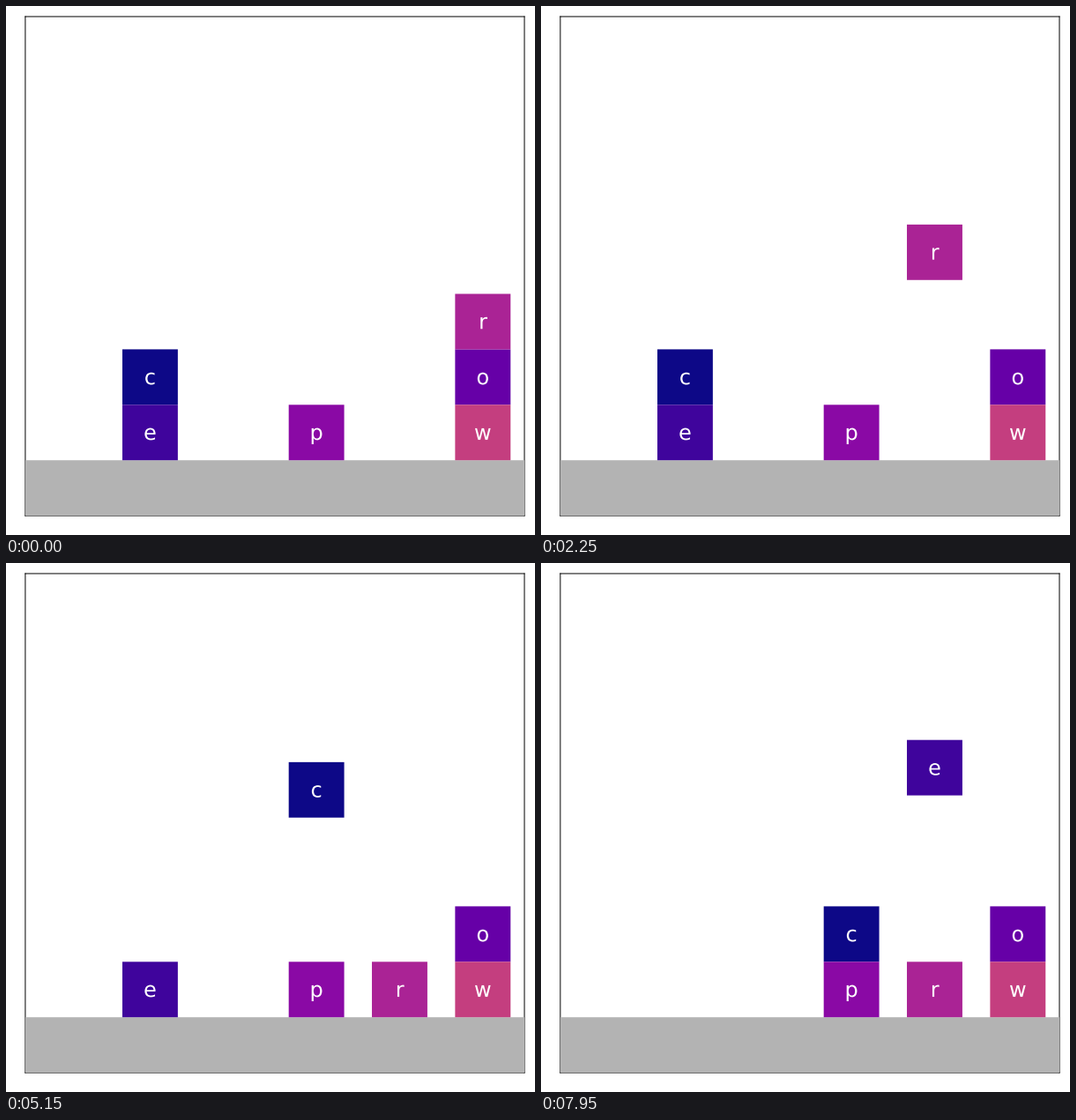
These frames come from a looping animation (600 by 600 pixels, 8000 ms). A matplotlib script:

```python
import matplotlib.pyplot as plt
from matplotlib.animation import FuncAnimation
from matplotlib.patches import PathPatch, Rectangle
from matplotlib.textpath import TextPath
from matplotlib.transforms import Affine2D

SIZE, DPI = 600, 80
FRAMES, INTERVAL = 160, 50
NEAR, FAR = 21.9, 12.0       # margins in pixels: left and bottom, right and top
CELLS = 9
CELL = (SIZE - NEAR - FAR) / CELLS
FONT = 24 / CELL             # letter size in cells
MID_LINE = 0.346             # middle of the text line above its baseline, in em
HOLD_Y = 5                   # height at which a block is carried
CYCLE = 58                   # frames from one pick-up to the next
LIFT, SHIFT = 20, 10         # steps of a vertical and a horizontal leg

# name: (column, level); the order sets the colour
START = {"c": (1, 1), "e": (1, 0), "o": (5, 1),
         "p": (3, 0), "r": (5, 2), "w": (5, 0)}
# block, target column, target level
MOVES = [("r", 4, 0), ("c", 3, 1), ("e", 4, 1)]


def column_x(col):
    return 1.5 * col + 0.25


def leg(step, length):
    """Progress from 0 to 1 along a leg."""
    return min(max(step / length, 0), 1)


def since(frame, start):
    """Steps done in a phase, whose first step is skipped."""
    step = frame - start
    return step if step >= 2 else 0


def mix(a, b, t):
    return a + (b - a) * t


def place(name, frame):
    col, level = START[name]
    x, y = column_x(col), level
    for i, (mover, to_col, to_level) in enumerate(MOVES):
        if mover != name:
            continue
        pick = since(frame, CYCLE * i - 1)
        put = since(frame, CYCLE * i + 28)
        x = mix(x, column_x(to_col), leg(put, SHIFT))
        y = mix(y, HOLD_Y, leg(pick, LIFT))
        y = mix(y, to_level, leg(put - SHIFT, LIFT))
    return x, y


def glyphs(text):
    return TextPath((0, 0), text, size=FONT, prop={"family": "DejaVu Sans"})


def letter_path(char):
    """Letter centred in a unit cell by its advance width."""
    path = glyphs(char)
    advance = glyphs(char * 2).get_extents().width - path.get_extents().width
    shift = Affine2D().translate(0.5 - advance / 2, 0.5 - MID_LINE * FONT)
    return shift.transform_path(path)


fig = plt.figure(figsize=(SIZE / DPI, SIZE / DPI), dpi=DPI, facecolor="white")
side = CELL * CELLS / SIZE
ax = fig.add_axes([NEAR / SIZE, NEAR / SIZE, side, side])
ax.set(xlim=(0, CELLS), ylim=(-1, CELLS - 1), xticks=[], yticks=[])
for spine in ax.spines.values():
    spine.set(linewidth=72 / DPI, snap=False)


def add(patch, color, zorder):
    patch.set(facecolor=color, edgecolor="none", snap=False, zorder=zorder)
    ax.add_patch(patch)
    patch.set_clip_on(False)
    return patch


add(Rectangle((0, -1), CELLS, 1), "0.7", 3)

plasma = plt.get_cmap("plasma")
blocks = {}
for i, name in enumerate(START):
    blocks[name] = (add(Rectangle((0, 0), 1, 1), plasma(24 * i), 4),
                    add(PathPatch(letter_path(name)), "white", 5))


def draw(frame):
    for name, (box, letter) in blocks.items():
        x, y = place(name, frame)
        box.set_xy((x, y))
        letter.set_transform(Affine2D().translate(x, y) + ax.transData)
    return [artist for pair in blocks.values() for artist in pair]


anim = FuncAnimation(fig, draw, frames=FRAMES, interval=INTERVAL,
                     repeat=True, repeat_delay=0, blit=False)
plt.show()
```
